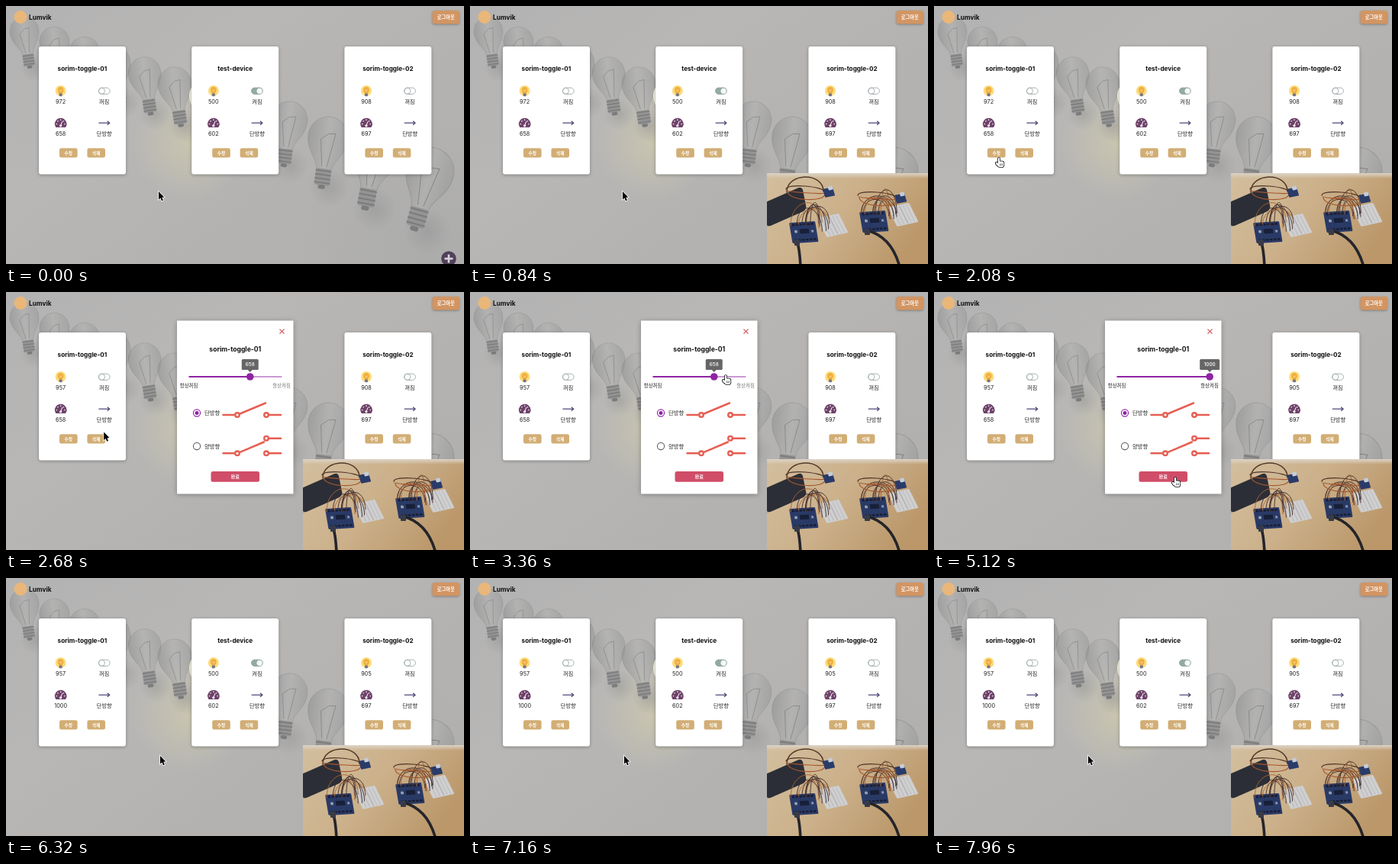
An HTML page with a canvas for the animation above (8000 ms loop, 600 px wide and 338 px high).

```html
<!DOCTYPE html>
<html lang="ko">
<head>
<meta charset="utf-8">
<title>Lumvik</title>
<style>
html, body { margin: 0; width: 100%; height: 100%; overflow: hidden; background: #b6b5b5; }
canvas { display: block; width: 600px; height: 338px; }
</style>
</head>
<body>
<canvas id="stage"></canvas>
<script>
const W = 600, H = 338, LOOP = 8000;
const FONT = 'Inter, "Noto Sans CJK KR", "Noto Sans CJK", sans-serif';
const INK = '#222', TAN = '#d2ae75', PURPLE = '#8f24a3', RED = '#e65e53';
const TIME = { photo: 400, open: 2400, light1: 2520, drag: 3720, dragEnd: 4160, light3: 4400, close: 5360 };
const scale = Math.max(1, window.devicePixelRatio || 1);
const stage = document.getElementById('stage');
let c;

function prepare(canvas) {
  canvas.width = W * scale;
  canvas.height = H * scale;
  const ctx = canvas.getContext('2d');
  ctx.scale(scale, scale);
  return ctx;
}

function layer(paint) {
  const canvas = document.createElement('canvas');
  c = prepare(canvas);
  paint();
  return canvas;
}

function local(x, y, paint, skewY = 0, skewX = 0) {
  c.save();
  c.transform(1, skewY, skewX, 1, x, y);
  paint();
  c.restore();
}

function seeded(seed) {
  return (min, max) => {
    seed = (seed * 16807) % 2147483647;
    return min + (max - min) * seed / 2147483647;
  };
}

function text(s, x, y, size, color = INK, weight = 400, align = 'center') {
  c.font = `${weight} ${size}px ${FONT}`;
  c.textAlign = align;
  c.fillStyle = color;
  c.fillText(s, x, y);
}

function box(x, y, w, h, r, color) {
  c.fillStyle = color;
  c.beginPath();
  c.roundRect(x, y, w, h, r);
  c.fill();
}

function raised(x, y, w, h, r, color, blur) {
  c.save();
  c.shadowColor = 'rgba(0,0,0,.3)';
  c.shadowBlur = blur * scale;
  c.shadowOffsetY = scale;
  box(x, y, w, h, r, color);
  c.restore();
}

function disc(x, y, r, color) {
  box(x - r, y - r, 2 * r, 2 * r, r, color);
}

function stroke(color, width) {
  c.strokeStyle = color;
  c.lineWidth = width;
  c.stroke();
}

function ring(x, y, r, color, width) {
  c.beginPath();
  c.arc(x, y, r, 0, Math.PI * 2);
  stroke(color, width);
}

function trace(points) {
  c.beginPath();
  for (let i = 0; i < points.length; i += 2) c.lineTo(points[i], points[i + 1]);
}

function line(points, color, width) {
  trace(points);
  stroke(color, width);
}

// Arc of cable between two points, pulled up by lift.
function wire(x1, y1, x2, y2, lift, color, width) {
  c.beginPath();
  c.moveTo(x1, y1);
  c.bezierCurveTo(x1, y1 - lift, x2, y2 - lift, x2, y2);
  stroke(color, width);
}

function fade(x0, y0, x1, y1, ...colors) {
  const g = c.createLinearGradient(x0, y0, x1, y1);
  colors.forEach((color, i) => g.addColorStop(i / (colors.length - 1), color));
  return g;
}

function glow(x, y, r, rgb, alpha) {
  const g = c.createRadialGradient(x, y, 0, x, y, r);
  g.addColorStop(0, `rgba(${rgb},${alpha})`);
  g.addColorStop(1, `rgba(${rgb},0)`);
  c.fillStyle = g;
  c.fillRect(x - r, y - r, 2 * r, 2 * r);
}

function glassBulb(x, y, r, lean) {
  glow(x + lean * 50 + r * .3, y + 2.5 * r, r, '135,135,135', .35);
  c.save();
  c.translate(x, y);
  c.rotate(-lean);
  c.scale(r, r);
  c.beginPath();
  c.moveTo(-.36, 1.65);
  c.bezierCurveTo(-.4, 1.1, -1, .8, -1, 0);
  c.arc(0, 0, 1, Math.PI, 0);
  c.bezierCurveTo(1, .8, .4, 1.1, .36, 1.65);
  c.fillStyle = fade(-1, 0, 1, 0, 'rgba(138,138,138,.5)', 'rgba(178,178,177,.5)', 'rgba(146,146,146,.45)');
  c.fill();
  stroke('rgba(130,130,130,.45)', .03);
  line([-.12, 1.5, -.35, .15, 0, -.15, .35, -.2, .12, 1.5], 'rgba(105,105,105,.6)', .03);
  box(-.38, 1.6, .76, .82, .1, '#949494');
  for (let i = 0; i < 4; i++) box(-.4, 1.66 + i * .2, .8, .07, .03, '#7c7c7c');
  box(-.18, 2.4, .36, .2, .1, '#7c7c7c');
  c.restore();
}

function paintBackdrop() {
  c.fillStyle = fade(0, 0, 250, 338, '#b3b2b2', '#b8b7b6', '#b3b2b1');
  c.fillRect(0, 0, W, H);
  glow(560, 330, 200, '166,166,166', .5);
  glow(240, 180, 75, '212,207,172', .6);
  for (let i = 0; i < 6; i++) glassBulb(24 + 39.4 * i, 33 + 13.8 * i, 19 + .6 * i, .15);
  for (let i = 0; i < 4; i++)
    glassBulb(371 + 46 * i + 5.2 * i * i, 149 + 22.5 * i, 24 + 2.4 * i, -.12 - .017 * i * i);
  disc(263, 118, 23, '#f2f0dd');
}

function pinBoard() {
  box(0, 0, 34, 27, 1.5, '#2a3a66');
  for (let i = 0; i < 6; i++) {
    box(3 + i * 5, 2, 3.5, 2.4, 0, '#171d33');
    box(3 + i * 5, 22, 3.5, 2.4, 0, '#171d33');
  }
  box(12, 9, 12, 6, 0, '#182039');
  disc(7, 12, 2, '#97a1b5');
  box(27, 11, 3, 3, 0, '#8795b5');
}

function breadboard() {
  box(0, 0, 28, 25, 1, '#cfcfd0');
  for (let i = 1; i < 6; i++) box(i * 4.7, 1, i === 3 ? 1.4 : .7, 23, 0, '#b2b2b6');
}

function kit(x, y, sensorX, sensorY, plugEnd, seed) {
  const rnd = seeded(seed);
  local(x + 37, y - 6, breadboard, -.22, .5);
  local(x, y, pinBoard, -.06, .17);
  for (let i = 0; i < 9; i++) {
    const color = i % 3 ? '#3a2a2a' : '#a8612f';
    wire(x + rnd(2, 30), y + rnd(1, 4), x + rnd(38, 56), y + rnd(-4, 12), rnd(24, 42), color, .9);
  }
  for (let i = 0; i < 3; i++)
    wire(sensorX - 48 + i, sensorY + i * 1.5, sensorX + 3, sensorY + 4 + i, 8 - 10 * i, i ? '#a5572f' : '#4d3226', 1.2);
  local(sensorX, sensorY, () => {
    box(0, 0, 13, 11, 1, '#2a3b69');
    box(7, -2, 6, 5, 1, '#c5ccd6');
  }, -.2, .3);
  const plugX = x + 10, plugY = y + 24;
  c.beginPath();
  c.moveTo(plugX, plugY);
  c.quadraticCurveTo(plugX + (plugEnd - plugX) * .75, plugY + 8, plugEnd, 342);
  stroke('#24252a', 3.6);
  box(plugX - 3, plugY - 2, 7, 8, 1, '#383b45');
}

function paintPhoto() {
  c.beginPath();
  c.rect(389, 219, 211, 119);
  c.clip();
  c.fillStyle = fade(400, 219, 560, 338, '#d2bd9c', '#cbb08a', '#bb976a');
  c.fillRect(389, 219, 211, 119);
  c.fillStyle = fade(0, 219, 0, 226, '#dcd3c6', 'rgba(220,211,198,0)');
  c.fillRect(389, 219, 211, 7);
  c.lineCap = 'round';
  line([385, 288, 436, 259], 'rgba(90,68,45,.35)', 6);
  local(383, 259, () => box(0, 0, 52, 31, 5, '#2c2e37'), -.44, .2);
  wire(415, 244, 463, 243, 26, '#553a2a', 1.5);
  kit(418, 284, 462, 240, 433, 7);
  kit(510, 270, 556, 248, 563, 23);
}

function bulbIcon(x, y) {
  disc(x, y, 7, '#fbdc7c');
  disc(x, y - 1, 3.9, '#eeae42');
  box(x - 2.2, y, 4.4, 4, 1, '#eeae42');
  line([x - 1.5, y - 1.3, x, y + .5, x + 1.5, y - 1.3], '#fff0ad', .8);
  box(x - 2, y + 3.6, 4, 3.6, 1, '#74758a');
}

function toggleIcon(x, y, on) {
  const color = on ? '#93aaa2' : '#a9b3b4';
  c.beginPath();
  c.roundRect(x - 7.4, y - 4.2, 14.8, 8.4, 4.2);
  stroke(color, 1);
  if (on) {
    c.fillStyle = color;
    c.fill();
    disc(x + 3.2, y, 3.6, '#f6f8f7');
  } else ring(x - 3.2, y, 4, color, 1);
}

function gaugeIcon(x, y) {
  c.fillStyle = '#6e4269';
  c.beginPath();
  c.arc(x, y + 1, 7.8, Math.PI * .8, Math.PI * 2.2);
  c.fill();
  for (let i = 0; i < 5; i++) {
    const a = Math.PI * (1 + i / 4);
    disc(x + Math.cos(a) * 5.3, y + 1 + Math.sin(a) * 5.3, .85, '#eee3ee');
  }
  line([x, y + 3, x + 2.3, y - 2.5], '#fff', 1);
  disc(x, y + 3.3, 1.6, '#fff');
}

function arrowIcon(x, y) {
  line([x - 7.3, y, x + 6.5, y], '#4c4272', 1.2);
  line([x + 4, y - 2.5, x + 7, y, x + 4, y + 2.5], '#4c4272', 1.2);
}

function button(label, x, y, w, h, color, size) {
  box(x, y, w, h, 2.5, color);
  text(label, x + w / 2, y + h / 2 + size * .37, size, '#fff', 700);
}

function card(x, name, light, limit, on) {
  const left = x + 28.6, right = x + 85.7;
  raised(x, 53, 114, 167.5, 3, '#fff', 4);
  text(name, x + 57, 85.2, 8.2, '#111', 700);
  bulbIcon(left, 111);
  toggleIcon(right, 111.3, on);
  gaugeIcon(left, 153.5);
  arrowIcon(right, 153.2);
  text(light, left, 127.8, 7.3);
  text(limit, left, 169.8, 7.3);
  text(on ? '켜짐' : '꺼짐', right, 127.8, 7.2);
  text('단방향', right, 169.8, 7.2);
  button('수정', x + 27, 186.2, 23.6, 12.4, TAN, 5.7);
  button('삭제', x + 63.4, 186.2, 23.6, 12.4, TAN, 5.7);
}

function contact(x, y) {
  line([x, y, x + 19, y], RED, 2.5);
  disc(x, y, 4, RED);
  disc(x, y, 1.6, '#fff');
}

function option(label, y, chosen, tipX, tipY) {
  ring(250, y, 4.6, chosen ? PURPLE : '#666', 1.1);
  if (chosen) disc(250, y, 2.5, PURPLE);
  text(label, 260, y + 2.6, 7.3, INK, 400, 'left');
  const wireY = chosen ? y + 2.5 : y + 9.3;
  c.lineCap = 'round';
  line([284.5, wireY, 303, wireY, tipX, tipY], RED, 2.5);
  disc(303, wireY, 4, RED);
  disc(303, wireY, 1.6, '#fff');
  contact(341, wireY);
  if (!chosen) contact(341, wireY - 19.6);
  c.lineCap = 'butt';
}

function modal(level) {
  const x = 240 + level * .1212, full = level === 1000, w = full ? 26 : 22;
  raised(224, 37.5, 152.5, 227, 1, '#fff', 6);
  for (const s of [-3, 3]) line([361.5 - s, 48.7, 361.5 + s, 54.7], '#d84550', 1.1);
  text('sorim-toggle-01', 300.3, 77.7, 8.6, '#111', 700);
  line([x, 111, 361.5, 111], '#d3a9dc', 1.4);
  c.setLineDash([1, 1]);
  line([x, 111, 361.5, 111], '#a95bb8', 1.4);
  c.setLineDash([]);
  line([239.5, 111, x, 111], PURPLE, 2);
  disc(x, 111, 4.8, PURPLE);
  box(x - w / 2, 88, w, 14, 1.5, '#666');
  trace([x - 3, 102, x + 3, 102, x, 105]);
  c.fill();
  text(level, x, 97.4, 6.4, '#fff', 500);
  text('항상꺼짐', 239.6, 125, 6.4);
  text('항상켜짐', 361, 125, 6.4, full ? INK : '#777');
  option('단방향', 158.5, true, 340, 145.5);
  option('양방향', 202, false, 338, 196.5);
  button('완료', 268.5, 235, 63.5, 13.7, '#d04d68', 6.2);
}

function hand() {
  const parts = new Path2D();
  parts.roundRect(-1.2, 0, 2.4, 9, 1.2);
  parts.roundRect(-1.2, 4.5, 7.6, 7.5, 2.2);
  parts.ellipse(-2.3, 8, 1.3, 2.6, -.6, 0, Math.PI * 2);
  c.strokeStyle = '#111';
  c.lineWidth = 1.6;
  c.stroke(parts);
  c.fillStyle = '#fff';
  c.fill(parts);
  for (let i = 0; i < 3; i++) box(1 + i * 1.7, 7.5, .6, 2.8, 0, '#333');
}

function arrow() {
  trace([0, 0, 0, 10.6, 2.4, 8.5, 4, 12.3, 5.8, 11.5, 4.2, 7.8, 7.3, 7.5]);
  c.closePath();
  stroke('#fff', 1.5);
  c.fillStyle = '#000';
  c.fill();
}

const moves = [
  { from: 1240, to: 1880, x: 85, y: 199 },
  { from: 2480, to: 3240, x: 335, y: 109 },
  { from: 3400, to: 3600, x: 320, y: 110 },
  { from: TIME.drag, to: TIME.dragEnd, x: 361, y: 110 },
  { from: 4360, to: 4920, x: 316, y: 243 },
  { from: 5440, to: 6080, x: 202, y: 233 }
];

function ease(t, from, to) {
  const k = Math.min(1, Math.max(0, (t - from) / (to - from)));
  return k * k * (3 - 2 * k);
}

function pointer(t) {
  let x = 200, y = 243;
  for (const m of moves) {
    const k = ease(t, m.from, m.to);
    x += (m.x - x) * k;
    y += (m.y - y) * k;
  }
  return [x, y];
}

const near = (x, y, cx, cy, rx, ry) => Math.abs(x - cx) <= rx && Math.abs(y - cy) <= ry;

const backdrop = layer(paintBackdrop);
const photo = layer(paintPhoto);
const main = prepare(stage);

function draw(t) {
  c = main;
  const [x, y] = pointer(t);
  const open = t >= TIME.open && t < TIME.close;
  const level = Math.round(658 + 342 * ease(t, TIME.drag, TIME.dragEnd));
  const link = open
    ? near(x, y, 301, 111, 65, 6) || near(x, y, 300, 242, 32, 7)
    : near(x, y, 82, 193, 12, 7);
  c.drawImage(backdrop, 0, 0, W, H);
  disc(19, 14.5, 8.5, '#e9b77a');
  text('Lumvik', 30, 18.2, 8.4, '#111', 700, 'left');
  raised(558.5, 6, 35.5, 17.5, 3, '#d29563', 3);
  text('로그아웃', 576.3, 17, 6.3, '#fff', 700);
  card(43, 'sorim-toggle-01', t < TIME.light1 ? 972 : 957, t < TIME.close ? 658 : 1000, false);
  card(243.2, 'test-device', 500, 602, true);
  card(443.4, 'sorim-toggle-02', t < TIME.light3 ? 908 : 905, 697, false);
  disc(580, 331, 9.8, '#51405a');
  line([574.5, 331, 585.5, 331], '#d8d3da', 2.6);
  line([580, 325.5, 580, 336.5], '#d8d3da', 2.6);
  if (open) modal(level);
  if (t >= TIME.photo) c.drawImage(photo, 0, 0, W, H);
  local(x, y, link ? hand : arrow);
}

const start = performance.now();
function tick() {
  draw((performance.now() - start) % LOOP);
  requestAnimationFrame(tick);
}
tick();
</script>
</body>
</html>
```
